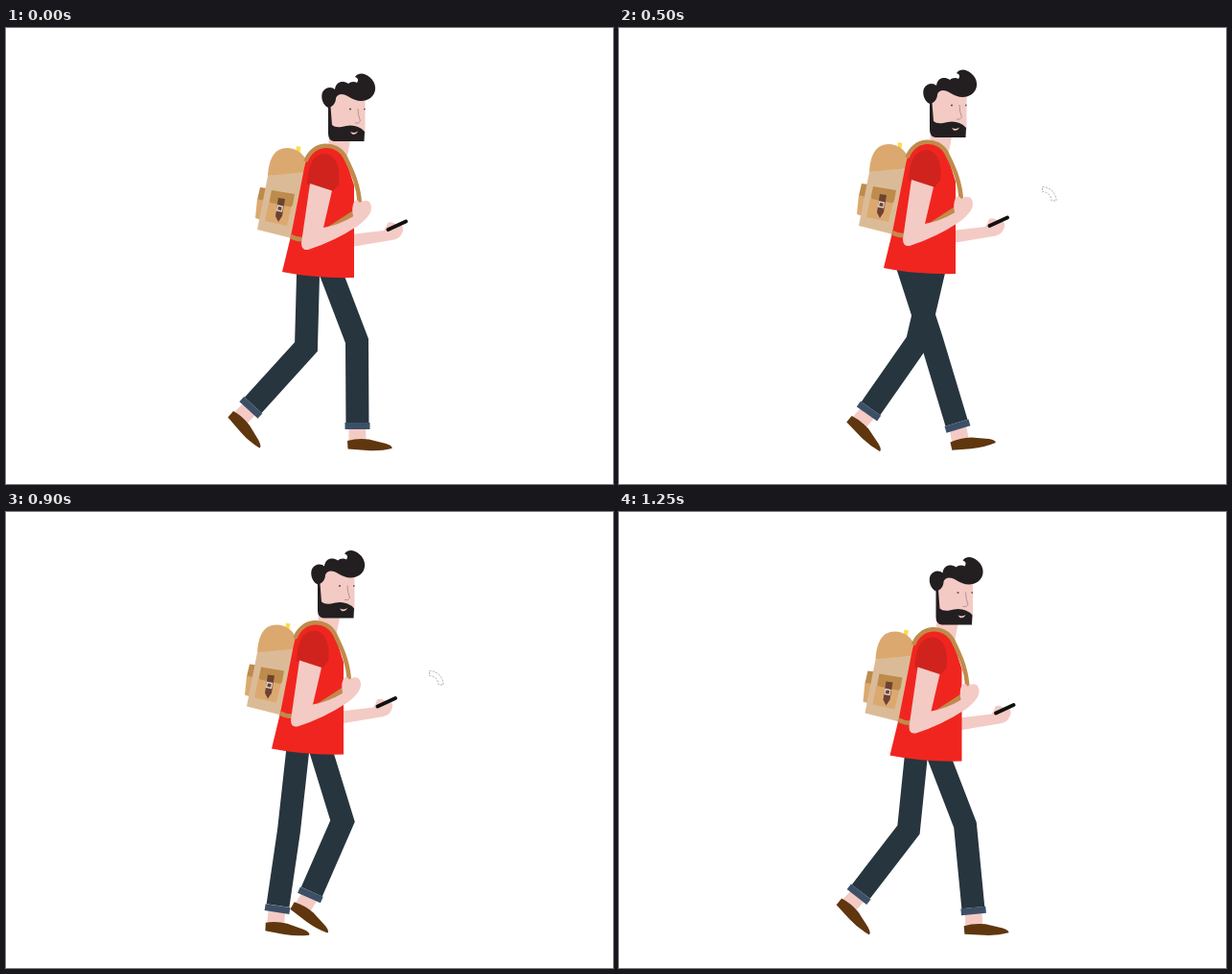
Recreate the animation shown at these times as an HTML page. Size 633 by 475 pixels, loop 1300 ms.

```html
<!DOCTYPE html>
<html lang="en">
<head>
<meta charset="utf-8">
<title>Walking man</title>
<style>
  html, body { margin: 0; width: 100%; height: 100%; overflow: hidden; background: #fff; }
  svg { display: block; width: 100vw; height: 100vh; }
  .skin { fill: #f4cac5; }
  .hair { fill: #231f20; }
  .red { fill: #f1251f; }
  .sleeve { fill: #d0231d; }
  .sand { fill: #dbbb97; }
  .tan { fill: #dba970; }
  .ochre { fill: #bd8b4b; }
  .brown { fill: #6d4233; }
  .shoe { fill: #5f360e; }
  .pants { fill: none; stroke: #27353e; stroke-width: 24; stroke-miterlimit: 6; }
  .cuff { stroke: #3b5066; stroke-width: 26; }
  .strap { fill: none; stroke: #c08b4b; stroke-width: 4.5; }
  .line { fill: none; stroke: #a98580; stroke-width: .8; }
  #signal path { fill: #fff; stroke: #888; stroke-width: .7; stroke-dasharray: 2 1.4; }
</style>
</head>
<body>
<svg viewBox="0 0 633 475">
  <defs>
    <g id="foot">
      <path class="skin" d="M-9-3H8.5L9 13H-9Z"/>
      <path class="shoe" d="M-10.5 12Q0 9 12 10.500L30 15Q37 17.500 36 20Q24 23 10 22L-10 20.500Z"/>
    </g>
  </defs>

  <g id="signal"></g>

  <g class="body">
    <path class="skin" d="M360 215L394 211Q397 207 398 203Q402 201 406 204L413 206Q416 210 411 217Q408 220 402 221L360 228Z"/>
    <path d="M398.500 210L417 201.500" stroke="#111" stroke-width="4" stroke-linecap="round"/>
  </g>

  <g id="legs"></g>

  <g class="body">
    <!-- backpack -->
    <path d="M303 123L307.500 124L305 137L301 136Z" fill="#fbdc4b"/>
    <path class="ochre" d="M265 166L273 167L270 181L262 179Z"/>
    <path class="tan" d="M262 178L270 180L266 200L260 198Z"/>
    <path class="sand" d="M273 154L314 147L298 219L262 210Z"/>
    <path class="tan" d="M273 154C274 136 280 125 293 125C304 125 311 132 314 140L312 150Z"/>
    <path class="tan" d="M274 181L298 185L293 206L270 201Z"/>
    <path class="ochre" d="M277 169L301 173L299 184Q298 187 295 186L276 182Q274 181 275 179Z"/>
    <path class="brown" d="M284 177L291 178L288 196L284 202L281 196Z"/>
    <path d="M283.500 185L288.500 186L287.500 191L282.500 190Z" fill="none" stroke="#e3d5cb" stroke-width="1.300"/>

    <!-- head -->
    <path class="skin" d="M337 112H360L355 138H335Z"/>
    <path class="skin" d="M338 68H374.500V110H338Z"/>
    <path class="hair" d="M336 80L338.500 82L340 101Q343 104 350 103Q360 100 367 103Q372 105 374 108L373.500 118H342Q336 117 336 110Z"/>
    <path class="skin" d="M359 108Q364 110 367 107.500Q365 111.500 361 110.500Z"/>
    <path class="hair" d="M336 83C330 80 328 72 330 67C333 61 340 61 343 64C344 56 351 54 357 58C359 56 363 55 366 57C368 54 367 52 364 51C368 46 374 47 379 51C387 57 387 68 380 73C373 78 364 76 358 72C352 68 346 68 344 73C344 78 341 82 336 83Z"/>
    <path class="line" d="M367 84Q367 91 369.500 97Q368 100 364 99"/>
    <path d="M358 84.500h2M373 84.500h1.500" stroke="#5a4744" stroke-width="1.400"/>

    <!-- shirt -->
    <path class="red" d="M288 254L297 217L311 146C314 130 322 123 335 123C346 123 353 131 357 145L363 164V260Q322 261 288 254Z"/>
    <path class="strap" d="M312.500 139C319 119 345 117 354 135C362 151 368 165 369 184"/>
    <path class="strap" d="M297 217Q305 222 316 219" stroke-width="6"/>
    <path class="strap" d="M334 211L368 189"/>
    <path class="sleeve" d="M314 163C315 143 320 131 333 131C345 132 349 147 347 163L341 170Z"/>

    <!-- near arm -->
    <path class="skin" d="M317 162L340 169.500L331 208Q348 205 362 196Q360 187 363 181Q366 177 369 182Q374 178 379 181Q383 187 379 194Q375 200 367 206Q343 222 315 231Q308 232 308 224Z"/>
  </g>
</svg>

<script>
const LOOP = 1300, STEP = 50;

// time, x, y
const sway = [
  [0, 0, 0], [150, 0, -8], [250, -5, -7.8], [400, -11, -6.2], [500, -12, -4],
  [600, -4.5, -.5], [700, 2.5, 1], [800, -4, -5], [900, -11, -7.5],
  [1050, -14, -3.5], [1150, -11.5, -2], [1250, -5.5, -.5]
];

// time, knee x, knee y, ankle x, ankle y, foot angle
const legA = [
  [0, 366, 326, 366.5, 418, 0], [150, 341, 330, 341, 419, 1],
  [325, 317, 331, 300, 418, 4], [500, 311, 327, 258.5, 402, 42],
  [600, 324, 332, 261, 396, 48], [700, 348, 333, 284, 390, 50],
  [900, 351, 322, 316, 402, 33], [1050, 350, 325, 363, 418.5, -5],
  [1125, 356, 325, 371, 418.5, -4], [1250, 361, 326, 370, 419, -1]
];
const legB = [
  [0, 313, 332, 253, 398, 45], [150, 335, 329, 277.5, 388, 50],
  [325, 343, 321, 311, 399, 35], [500, 326, 325, 354, 418, -9],
  [600, 338, 329, 356, 419, -1], [700, 335, 334, 334, 419, 2],
  [900, 295, 332, 282.5, 417, 6], [1050, 283, 326, 249, 409, 24],
  [1125, 287, 329, 234, 403, 35], [1250, 302, 331, 248, 401, 43]
];

// Smooth cyclic curve through the keys
function sample(keys, t) {
  const n = keys.length;
  const at = i => {
    const k = keys[(i + n) % n], turn = Math.floor(i / n) * LOOP;
    return [k[0] + turn, ...k.slice(1)];
  };
  let i = n - 1;
  while (keys[i][0] > t) i--;
  const [p, a, b, q] = [at(i - 1), at(i), at(i + 1), at(i + 2)];
  const h = b[0] - a[0], u = (t - a[0]) / h, v = 1 - u;
  return a.slice(1).map((from, j) => {
    const c = j + 1, to = b[c];
    const m0 = (to - p[c]) / (b[0] - p[0]) * h;
    const m1 = (q[c] - from) / (q[0] - a[0]) * h;
    return from * (1 + 2 * u) * v * v + m0 * u * v * v
         + to * u * u * (3 - 2 * u) - m1 * u * u * v;
  });
}

function add(parent, tag, attrs) {
  const el = document.createElementNS("http://www.w3.org/2000/svg", tag);
  for (const name in attrs) el.setAttribute(name, attrs[name]);
  return parent.appendChild(el);
}

const bodies = document.querySelectorAll(".body");
const legsRoot = document.getElementById("legs");
const signal = document.getElementById("signal");

const legs = [[legB, 315], [legA, 340]].map(([keys, hip]) => ({
  keys, hip,
  foot: add(legsRoot, "use", { href: "#foot" }),
  pants: add(legsRoot, "path", { class: "pants" }),
  cuff: add(legsRoot, "path", { class: "cuff" })
}));

const waves = [14.5, 26, 37.5].map(r => {
  const s = r - 5;
  return add(signal, "path", {
    d: `M441.500 ${180 - r}A${r} ${r} 0 0 1 ${441.5 + r} 180H${441.5 + s}A${s} ${s} 0 0 0 441.500 ${180 - s}Z`
  });
});

function drawLeg(leg, t, bx, by) {
  const [kx, ky, ax, ay, turn] = sample(leg.keys, t);
  const hx = leg.hip + bx, hy = 258 + by;
  const up = .18;
  const len = Math.hypot(ax - kx, ay - ky);
  const cx = ax - (ax - kx) / len * 7, cy = ay - (ay - ky) / len * 7;
  leg.pants.setAttribute("d",
    `M${hx - (kx - hx) * up} ${hy - (ky - hy) * up}L${kx} ${ky}L${cx} ${cy}`);
  leg.cuff.setAttribute("d", `M${cx} ${cy}L${ax} ${ay}`);
  leg.foot.setAttribute("transform", `translate(${ax} ${ay}) rotate(${turn})`);
}

function draw(t) {
  const [bx, by] = sample(sway, t);
  bodies.forEach(b => b.setAttribute("transform", `translate(${bx} ${by})`));
  legs.forEach(leg => drawLeg(leg, t, bx, by));
  const shown = Math.floor(t / 100) % 4;
  waves.forEach((w, i) => w.style.display = i < shown ? "" : "none");
}

const start = performance.now();
function tick() {
  const t = (performance.now() - start) % LOOP;
  draw(Math.floor(t / STEP) * STEP);
  requestAnimationFrame(tick);
}
tick();
</script>
</body>
</html>
```
